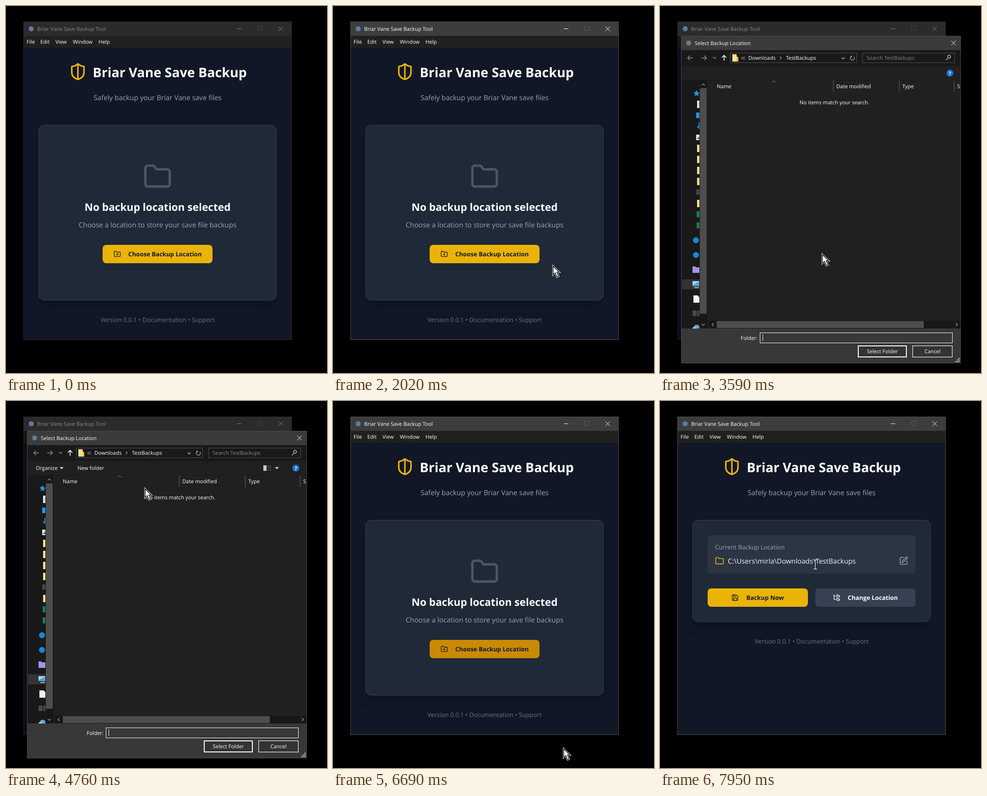
Write an HTML page that moves like this. It is 701x799 px and loops after 8000 ms.

```html
<!DOCTYPE html>
<html lang="en">
<head>
<meta charset="utf-8">
<title>Save Backup Tool</title>
<style>
html, body { margin: 0; width: 100%; height: 100%; overflow: hidden; background: #000; }
svg { display: block; }
text { font: 11.4px 'Open Sans', 'Noto Sans', sans-serif; fill: #fff; text-rendering: geometricPrecision; white-space: pre; }
.mid { text-anchor: middle; }
.end { text-anchor: end; }
.h1 { font-size: 28.6px; font-weight: 700; }
.h2 { font-size: 22.65px; font-weight: 700; }
.body { font-size: 15.2px; fill: #9ca3af; }
.small { font-size: 13.25px; fill: #9ca3af; }
.foot { font-size: 13.25px; fill: #6b7280; }
.btn { font-size: 13.2px; font-weight: 700; }
.dark { fill: #111827; }
.icon { fill: none; stroke-width: 2; stroke-linecap: round; stroke-linejoin: round; }
.line { fill: none; stroke: #fff; }
.dim { stroke: #8f8f8f; }
.card { fill: #1f2937; stroke: #374151; }
.shade { opacity: .12; filter: blur(11px); }
.shade.near { filter: blur(5px); }
#chrome { --ink: #8a8a8a; --bar: #2b2b2b; --edge: #2a2d33; --off: #424242; }
#chrome.active { --ink: #fff; --bar: #3c3d3d; --edge: #4d4f52; --off: #5a5a5a; }
#bar { fill: var(--bar); }
#edge { fill: none; stroke: var(--edge); }
#chrome .ink { fill: var(--ink); }
#chrome .ctl { fill: none; stroke: var(--ink); }
#chrome .off { fill: none; stroke: var(--off); }
.logo { fill: #5f7c98; }
</style>
</head>
<body>
<svg width="701" height="799" viewBox="0 0 701 799">
<defs>
  <path id="folder" d="M20 20a2 2 0 0 0 2-2V8a2 2 0 0 0-2-2h-7.9a2 2 0 0 1-1.7-.9L9.6 3.9A2 2 0 0 0 7.9 3H4a2 2 0 0 0-2 2v13a2 2 0 0 0 2 2Z"/>
  <path id="arrowShape" d="M2.500 6V21.500L6.500 17.700L10.500 27L12.800 26L8.900 16.800H13.300Z"/>
  <path id="beamShape" d="M-4-10h3l1 1 1-1h3M0-9V9M-4 10h3l1-1 1 1h3"/>
  <path id="page" d="M0 0h9l4 4v12H0z" fill="#f4f4f4"/>
  <path id="dir" d="M81 0h12v16H81z" fill="#ffe08a"/>
  <path id="tri" d="M-4.500-2h9L0 2.500z" fill="#d0d0d0"/>
  <path id="down" d="M-3.500-2L0 1.500 3.500-2" fill="none" stroke-width="1.500"/>
  <clipPath id="side"><rect x="47" y="162" width="39" height="540"/></clipPath>
  <clipPath id="list"><rect x="107" y="162" width="549" height="523"/></clipPath>
</defs>
<rect width="701" height="799"/>

<g id="chrome">
  <rect x="38" y="34" width="586" height="693" fill="#111726"/>
  <rect id="bar" x="38" y="34" width="586" height="31"/>
  <rect x="38" y="65" width="586" height="26" fill="#1f201f"/>
  <rect id="edge" x="38.500" y="34.500" width="585" height="692"/>
  <circle class="logo" cx="55" cy="49.500" r="5.500"/>
  <text class="ink" x="68" y="54">Briar Vane Save Backup Tool</text>
  <path class="ctl" d="M504 49.500h10M595 44.500l10 10M605 44.500l-10 10"/>
  <rect class="off" x="549.500" y="44.500" width="9" height="9"/>
  <text x="45" y="82">File</text><text x="75" y="82">Edit</text><text x="108" y="82">View</text>
  <text x="146" y="82">Window</text><text x="202" y="82">Help</text>
</g>

<g class="icon" stroke="#eab308" transform="translate(137 123) scale(1.667)">
  <path d="M20 13c0 5-3.500 7.500-7.700 9a1 1 0 0 1-.6 0C7.500 20.500 4 18 4 13V6a1 1 0 0 1 1-1c2 0 4.500-1.200 6.200-2.700a1.200 1.200 0 0 1 1.600 0C14.500 3.800 17 5 19 5a1 1 0 0 1 1 1zM12 22V2"/>
</g>
<text class="h1" x="189.500" y="155">Briar Vane Save Backup</text>
<text class="body mid" x="331" y="205">Safely backup your Briar Vane save files</text>

<g id="empty">
  <rect class="shade" x="76" y="284" width="510" height="372" rx="10"/>
  <rect class="shade near" x="77" y="273" width="508" height="370" rx="10"/>
  <rect class="card" x="71.500" y="259.500" width="519" height="381" rx="12"/>
  <use href="#folder" class="icon" stroke="#4b5563" transform="translate(299 339.700) scale(2.667)"/>
  <text class="h2 mid" x="331" y="446">No backup location selected</text>
  <text class="body mid" x="331" y="482">Choose a location to store your save file backups</text>
  <rect id="choose" x="211" y="520" width="240" height="40" rx="8"/>
  <g class="icon" stroke="#111827" transform="translate(235 532) scale(.667)"><use href="#folder"/><path d="M12 10v6M9 13h6"/></g>
  <text class="btn dark" x="267" y="545">Choose Backup Location</text>
</g>

<g id="ready">
  <rect class="shade" x="76" y="284" width="510" height="212" rx="10"/>
  <rect class="shade near" x="77" y="273" width="508" height="210" rx="10"/>
  <rect class="card" x="71.500" y="259.500" width="519" height="221" rx="12"/>
  <rect x="104" y="292" width="454" height="84" rx="8" fill="#2b3544"/>
  <text class="small" x="120" y="323">Current Backup Location</text>
  <use href="#folder" class="icon" stroke="#eab308" transform="translate(120 338) scale(.833)"/>
  <text class="body" x="148" y="354" style="fill:#f3f4f6">C:\Users\mirla\Downloads\TestBackups</text>
  <g class="icon" stroke="#9ca3af" transform="translate(522 338) scale(.833)">
    <path d="M12 3H5a2 2 0 0 0-2 2v14a2 2 0 0 0 2 2h14a2 2 0 0 0 2-2v-7M18.400 2.600a1 1 0 0 1 3 3L12 15l-4 1 1-4z"/>
  </g>
  <rect id="backup" x="104" y="408" width="219" height="40" rx="8"/>
  <g class="icon" stroke="#111827" transform="translate(156 420) scale(.667)">
    <path d="M15.200 3a2 2 0 0 1 1.400.6l3.800 3.800a2 2 0 0 1 .6 1.400V19a2 2 0 0 1-2 2H5a2 2 0 0 1-2-2V5a2 2 0 0 1 2-2zM17 21v-7a1 1 0 0 0-1-1H8a1 1 0 0 0-1 1v7M7 3v4a1 1 0 0 0 1 1h7"/>
  </g>
  <text class="btn dark" x="188.500" y="433">Backup Now</text>
  <rect x="339" y="408" width="219" height="40" rx="8" fill="#374151"/>
  <g class="icon" stroke="#fff" transform="translate(378 420) scale(.667)">
    <path d="M3 3v13a2 2 0 0 0 2 2h3M3 5a2 2 0 0 0 2 2h3M12 4a1 1 0 0 1 1-1h2l1.700 2H20a1 1 0 0 1 1 1v3a1 1 0 0 1-1 1h-7a1 1 0 0 1-1-1zM12 15a1 1 0 0 1 1-1h2l1.700 2H20a1 1 0 0 1 1 1v3a1 1 0 0 1-1 1h-7a1 1 0 0 1-1-1z"/>
  </g>
  <text class="btn" x="410" y="433">Change Location</text>
</g>
<text id="foot" class="foot mid" x="331" y="688">Version 0.0.1 • Documentation • Support</text>

<g id="dialog">
  <rect x="38" y="65" width="9" height="662" opacity=".35"/>
  <rect x="46" y="65" width="611" height="713" fill="#191919"/>
  <rect x="46" y="65" width="611" height="31" fill="#3b3b3b"/>
  <circle class="logo" cx="62.500" cy="80.500" r="5.500"/>
  <text x="76" y="85">Select Backup Location</text>
  <path class="line" d="M636 75.500l10 10M646 75.500l-10 10"/>

  <path class="line dim" stroke-width="1.500" d="M72 113H60.500m5-5l-5 5 5 5M90 113h11.500m-5-5l5 5-5 5"/>
  <use href="#down" x="119" y="113" stroke="#8f8f8f"/>
  <path class="line" stroke-width="1.600" d="M140 119v-11.500m-5 5l5-5 5 5"/>
  <rect x="153.500" y="102.500" width="276" height="21" fill="#191919" stroke="#535353"/>
  <path d="M158 105h9l1 6h3v10h-13z" fill="#ffe08a"/>
  <path d="M168 111h3v10h-4z" fill="#e9b84a"/>
  <rect id="crumb" x="270" y="104" width="76" height="19" fill="#404040"/>
  <path class="line" stroke="#ccc" d="M181 110.500l-3 3 3 3M185 110.500l-3 3 3 3M262 110l3 3-3 3"/>
  <text x="193" y="117">Downloads</text><text x="275" y="117">TestBackups</text>
  <use href="#down" x="400" y="114" stroke="#b0b0b0"/>
  <path class="line" stroke-width="1.300" style="stroke:#b0b0b0" d="M423.500 110.500a4.500 4.500 0 1 1-5-1.300h-2.500m2.500 0v2.600"/>
  <rect x="442.500" y="102.500" width="201" height="21" fill="#191919" stroke="#535353"/>
  <text x="451" y="117" style="fill:#8a8a8a">Search TestBackups</text>
  <path class="line" stroke-width="1.500" style="stroke:#c0c0c0" d="M624.500 118l4-4m-.5-3.500a3.300 3.300 0 1 0 6.600 0a3.300 3.300 0 1 0-6.600 0"/>

  <rect x="47" y="131" width="609" height="30" fill="#202020"/>
  <g id="tools">
    <text x="65" y="150">Organize</text><use href="#tri" x="121.500" y="146"/>
    <text x="156" y="150">New folder</text>
    <rect x="562" y="140" width="7" height="12" fill="#c8c8c8"/>
    <path class="line dim" stroke-dasharray="3 1.500" d="M571 141.500h8M571 145.500h8M571 150.500h8"/>
    <use href="#tri" x="591.500" y="146"/>
  </g>
  <circle cx="633" cy="146" r="7.500" fill="#1675d8"/>
  <text class="mid" x="633" y="150.500" style="font-weight:700">?</text>

  <g clip-path="url(#side)">
    <rect x="48" y="595" width="38" height="22" fill="#333"/>
    <path d="M80 183l2 5 5 1-4 3 1 5-4-3-5 2 2-4-4-4 5-1z" fill="#2492dd"/>
    <use href="#page" x="81" y="206"/><path class="line dim" d="M83 211.500h4M83 214.500h4M83 217.500h4"/>
    <rect x="79" y="232" width="14" height="12" fill="#1e96ee"/>
    <path d="M84 254h5v8h4l-6.500 7-6.500-7h4z" fill="#1e8be0"/>
    <rect x="79" y="280" width="14" height="12" fill="#eee"/><path d="M80 290l4-6 4 6z" fill="#4a7ea5"/>
    <use href="#dir" y="302"/><use href="#dir" y="326"/><use href="#dir" y="350"/>
    <use href="#dir" y="374"/><use href="#dir" y="422"/>
    <rect x="79" y="399" width="14" height="12" fill="#454545"/>
    <rect x="80" y="447" width="13" height="13" fill="#15804f"/>
    <rect x="80" y="471" width="13" height="13" fill="#15804f"/>
    <circle cx="78.500" cy="510" r="6.500" fill="#1a86d0"/>
    <circle cx="78.500" cy="542" r="6.500" fill="#1a86d0"/>
    <path d="M71 567h6l2 2h9v12H71z" fill="#a594e6"/>
    <path d="M71 599h16v11H71z" fill="#4aa3df"/><path d="M71 599h16L71 608z" fill="#a5d8f5"/><path d="M75 612h10v2H75z" fill="#bbb"/>
    <use href="#page" x="73" y="630"/>
    <path d="M71 663h15v12H71z" fill="#484848"/><path d="M80 663h2v12h-2z" fill="#222"/>
    <circle cx="80" cy="701" r="7" fill="#5aa9dc"/><path d="M71 700h8v3h-8z" fill="#ddd"/>
  </g>
  <rect x="87" y="162" width="15" height="540" fill="#171717"/>
  <rect x="87" y="179" width="15" height="491" fill="#4d4d4d"/>
  <path class="line dim" stroke-width="1.500" d="M91 173l3.500-3.500L98 173M91 692l3.500 3.500L98 692"/>
  <path class="line" style="stroke:#303030" d="M105.500 162v540"/>

  <g clip-path="url(#list)">
    <rect x="107" y="162" width="549" height="523" fill="#202020"/>
    <rect id="head" x="107" y="162" width="271" height="25" fill="#434343"/>
    <path class="line" style="stroke:#636363" d="M378.500 162v25M522.500 162v25M642.500 162v25"/>
    <path class="line dim" d="M244.500 166l4-3.500 4 3.500"/>
    <text x="124" y="179">Name</text><text x="385" y="179">Date modified</text>
    <text x="529" y="179">Type</text><text x="649" y="179">Size</text>
    <text class="mid" x="381" y="214">No items match your search.</text>
  </g>
  <rect x="107" y="685" width="549" height="17" fill="#171717"/>
  <rect x="124" y="686" width="452" height="15" fill="#4d4d4d"/>
  <path class="line dim" stroke-width="1.500" d="M117 690l-3.500 3.500 3.500 3.500M646 690l3.500 3.500-3.500 3.500"/>

  <rect x="46" y="702" width="611" height="76" fill="#383838"/>
  <text class="end" x="213" y="727">Folder:</text>
  <rect id="field" x="218.500" y="711.500" width="420" height="22" fill="#383838"/>
  <path id="caret" class="line" d="M224.500 715v14"/>
  <rect id="select" x="433" y="740" width="105" height="24" stroke="#fff" stroke-width="2"/>
  <text class="mid" x="485.500" y="756">Select Folder</text>
  <rect x="551.700" y="739.700" width="86.600" height="24.600" fill="#333" stroke="#ddd" stroke-width="1.400"/>
  <text class="mid" x="595" y="756">Cancel</text>
  <path class="line" stroke-width="2" stroke-dasharray="2 1.500" d="M645 774h9M648.500 770.500h6M652 767h2"/>
  <rect x="46.500" y="65.500" width="610" height="712" fill="none" stroke="#4a4a4a"/>
</g>

<g id="pointer">
  <circle id="click" r="12" fill="#ff0" fill-opacity=".47"/>
  <g id="arrow" stroke-miterlimit="6">
    <use href="#arrowShape" stroke="#fff" stroke-width="4.600"/>
    <use href="#arrowShape" stroke="#000" stroke-width="2.800"/>
    <use href="#arrowShape" fill="#fff"/>
  </g>
  <path id="hand" fill="#fff" stroke="#000" stroke-width="1.400" d="M-2 2.500a2 2 0 0 1 4 0V9a2 2 0 0 1 4 .6a2 2 0 0 1 4 .8a2 2 0 0 1 3.800 1V17c0 4-2 7-4 7H1c-2-2-5-6-6-8-1-2 1.500-3.500 3-1.500Z"/>
  <g id="beam" fill="none">
    <use href="#beamShape" stroke="#111" stroke-width="3"/>
    <use href="#beamShape" stroke="#f5f5f5" stroke-width="1.400"/>
  </g>
</g>
</svg>
<script>
const LOOP = 8000, STEP = 70;
const OPENED = 3520, CLOSED = 6620, CHOSEN = 6760;

// Pointer path: time, x, y
const path = [
  [0, 720, 880], [460, 720, 880], [530, 632, 772], [670, 590, 720], [810, 530, 645],
  [950, 450, 560], [1020, 425, 548], [1160, 440, 555], [1300, 486, 569], [1930, 486, 569],
  [2000, 479, 562], [2350, 420, 553], [2770, 353, 537], [4170, 353, 537], [4590, 322, 260],
  [4800, 292, 150], [4940, 283, 117], [5010, 283, 117], [5220, 293, 116], [5430, 293, 116],
  [5850, 479, 645], [6200, 502, 747], [6270, 502, 753], [6690, 502, 753], [7040, 445, 590],
  [7180, 380, 510], [7320, 250, 430], [7390, 238, 427], [7530, 245, 422], [7670, 272, 405],
  [7950, 339, 356], [LOOP, 339, 356]
];
const clicks = [[1410, 1540], [3250, 3390], [6550, CLOSED]];

const el = {};
document.querySelectorAll('[id]').forEach(n => el[n.id] = n);
const show = (node, on) => { node.style.display = on ? '' : 'none'; };
const within = (t, a, b) => t >= a && t < b;

function pointerAt(t) {
  const i = path.findIndex(p => p[0] > t);
  if (i < 1) return path[i ? path.length - 1 : 0].slice(1);
  const [a, b] = [path[i - 1], path[i]];
  const k = (t - a[0]) / (b[0] - a[0]);
  return [1, 2].map(n => Math.round(a[n] + (b[n] - a[n]) * k));
}

function over(t, x0, y0, x1, y1) {
  const [x, y] = pointerAt(Math.max(t, 0));
  return within(x, x0, x1) && within(y, y0, y1);
}

const chooseHit = t => over(t, 211, 520, 451, 560);
const backupHit = t => over(t, 104, 408, 323, 448);

function buttonFill(hit, t) {
  const k = (hit(t) + hit(t - STEP)) / 2;
  const mix = (a, b) => Math.round(a + (b - a) * k);
  return `rgb(${mix(234, 202)},${mix(179, 138)},${mix(8, 4)})`;
}

function render(t) {
  const q = Math.max(0, Math.floor((t + 30) / STEP) * STEP - 30);
  const chosen = t >= CHOSEN, open = within(t, OPENED, CLOSED);

  el.chrome.classList.toggle('active', within(t, 1410, 3390) || t >= CLOSED);
  show(el.empty, !chosen);
  show(el.ready, chosen);
  el.foot.setAttribute('y', chosen ? 528 : 688);
  el.choose.style.fill = t < 3390 ? buttonFill(chooseHit, q) : '#ca8a04';
  el.backup.style.fill = buttonFill(backupHit, q);

  show(el.dialog, open);
  if (open) {
    const focused = t < 4870;
    el.dialog.style.opacity = t < OPENED + STEP ? .6 : 1;
    show(el.tools, t >= 3700);
    show(el.crumb, over(q, 270, 104, 346, 123));
    show(el.head, over(q, 107, 162, 378, 187));
    show(el.caret, focused && Math.floor((t - OPENED) / 530) % 2 === 0);
    el.field.style.stroke = focused || over(q, 218, 711, 639, 734) ? '#fff' : '#9b9b9b';
    el.select.style.fill = over(q, 432, 739, 539, 765) ? '#454545' : '#333';
  }

  const hand = t < 3390 ? chooseHit(q) : chosen && backupHit(q);
  const beam = chosen && over(q, 148, 336, 426, 362);
  show(el.hand, hand);
  show(el.beam, beam);
  show(el.arrow, !hand && !beam);
  show(el.click, clicks.some(c => within(t, ...c)));
  el.pointer.setAttribute('transform', `translate(${pointerAt(q)})`);
}

const start = performance.now();
function tick() {
  render((performance.now() - start) % LOOP);
  requestAnimationFrame(tick);
}
tick();
</script>
</body>
</html>
```
